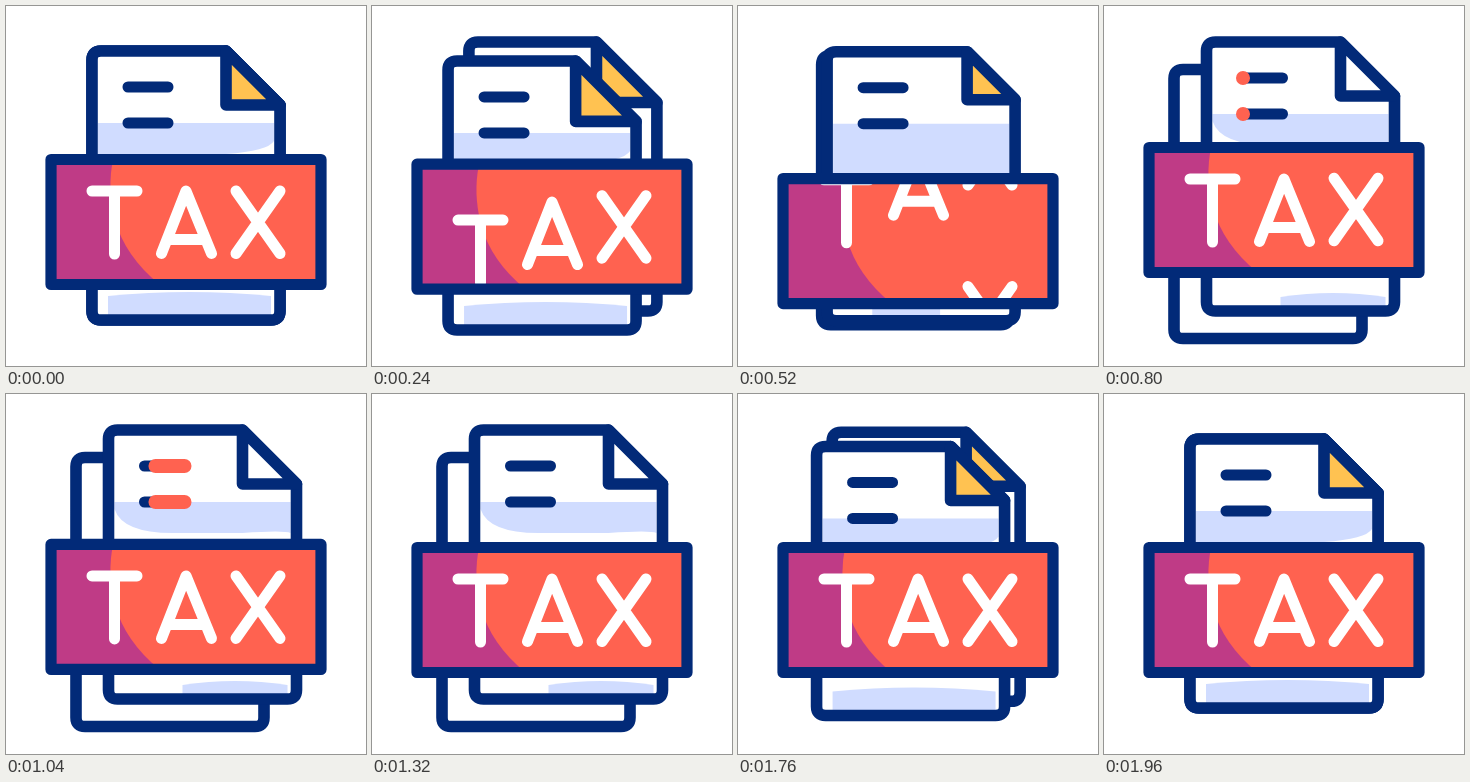
An HTML page that plays this animation: 360x360 px, repeating every 2 s.

```html
<!DOCTYPE html>
<html lang="en">
<head>
<meta charset="utf-8">
<title>Tax documents</title>
<style>
  html, body { margin: 0; width: 100%; height: 100%; overflow: hidden; background: #fff; }
  svg { display: block; width: 100vw; height: 100vh; }
  .ink { stroke: #022a78; stroke-width: 11.6; stroke-linecap: round; stroke-linejoin: round; }
  .line { stroke-width: 11; }
  .flap { fill: #ffc251; }
  .shade { fill: #d0dcff; }
  .mark { stroke: #ff6250; stroke-width: 14; stroke-linecap: round; }
  .frame { fill: none; stroke-width: 11.2; }
  .glyph { fill: none; stroke: #fff; stroke-width: 11; stroke-linecap: round; stroke-linejoin: round; }
</style>
</head>
<body>
<svg viewBox="0 0 360 360">
  <defs>
    <clipPath id="window"><rect x="45" y="153.500" width="270" height="125"/></clipPath>
  </defs>
  <g id="back">
    <path class="ink sheet" fill="#fff"/>
    <path class="ink flap"/>
  </g>
  <g id="front">
    <path class="sheet" fill="#fff"/>
    <path id="band" class="shade"/>
    <path id="foot" class="shade"/>
    <path class="ink sheet" fill="none"/>
    <path class="ink flap" id="frontFlap"/>
    <path class="ink line" d="M122 81H162M122 117H162"/>
    <path id="mark" class="mark"/>
  </g>
  <g id="label">
    <rect x="45" y="153.500" width="270" height="125" fill="#bf3b86"/>
    <path fill="#ff6250" d="M107 154Q101 182 109 214Q119 250 153 278H315V154Z"/>
    <g id="letters" clip-path="url(#window)"></g>
    <rect class="ink frame" x="45" y="153.500" width="270" height="125"/>
  </g>
</svg>
<script>
const LOOP = 2000;
const WRAP = 164, SCROLL = 580, FIRST = 100, STAGGER = 72;
const SVG = "http://www.w3.org/2000/svg";
const $ = id => document.getElementById(id);
const ramp = (t, from, to) => Math.min(1, Math.max(0, (t - from) / (to - from)));
const ease = (t, from, to) => {
  const u = ramp(t, from, to);
  return u * u * (3 - 2 * u);
};
const pulse = (t, from, to) => Math.sin(Math.PI * ramp(t, from, to)) ** 2;
const mix = (a, b, u) => a + (b - a) * u;
const move = (node, x, y) => node.setAttribute("transform", `translate(${x} ${y})`);
const setPath = (nodes, d) => nodes.forEach(node => node.setAttribute("d", d));

// Each sheet swings out to "near", then across to "far", and back the same way.
const sheets = [
  { node: $("front"), near: [-10.5, 10.5], far: [16.5, -9] },
  { node: $("back"), near: [11.5, -9.5], far: [-16, 18.5] }
];
const outlines = document.querySelectorAll(".sheet");
const flaps = document.querySelectorAll(".flap");

const letters = [
  "M86 185H131M108.500 185V248",
  "M155.500 247.500L180 185L205.500 247.500M164 233.500H197",
  "M230 185L274 247.500M274 185L230 247.500"
].map(d => {
  const group = document.createElementNS(SVG, "g");
  for (const y of [0, -WRAP]) {
    const glyph = document.createElementNS(SVG, "path");
    glyph.setAttribute("class", "glyph");
    glyph.setAttribute("d", d);
    move(glyph, 0, y);
    group.append(glyph);
  }
  $("letters").append(group);
  return group;
});

function drawSheets(t, swap) {
  const apart = ease(t, 0, 280) - ease(t, 1650, 1960);
  for (const { node, near, far } of sheets) {
    const [x, y] = near.map((v, i) => apart * mix(v, far[i], swap));
    move(node, x, y);
  }
  const fold = 54 + 6.5 * pulse(t, 60, 400) - 6 * pulse(t, 360, 680) + 6 * pulse(t, 1400, 1720);
  const x = 274 - fold, y = 45 + fold;
  setPath(outlines, `M86 54Q86 45 95 45H${x}L274 ${y}V305Q274 314 265 314H95Q86 314 86 305Z`);
  setPath(flaps, `M${x} 45V${y}H274Z`);
  $("frontFlap").style.fill = swap > 0.9 ? "#fff" : "";
}

function drawShading(t, swap) {
  const full = pulse(t, 360, 680);
  const base = 148 + 45 * full - 9 * pulse(t, 1400, 1720);
  const left = base - 24 * swap, right = base - 13 * (1 - swap);
  $("band").setAttribute("d",
    `M92 117H268V${right}Q262 ${base - 3} 220 ${base}H150Q100 ${base} 92 ${left}Z`);

  const x0 = 102 + 58 * swap, x1 = 265 - 66 * full, top = 286 + 10 * swap;
  $("foot").setAttribute("d",
    `M${x0} 309V${top + 4}Q${(x0 + x1) / 2} ${top - 4} ${x1} ${top + 4}V309Z`);
}

function drawMarks(t) {
  const head = mix(122.5, 162, ease(t, 800, 1040)) + 0.01;
  const tail = mix(122.5, 162, ease(t, 960, 1200));
  $("mark").setAttribute("d", `M${tail} 81H${head}M${tail} 117H${head}`);
  $("mark").style.display = t >= 760 && t < 1220 ? "" : "none";
}

function drawLabel(t) {
  const rise = ease(t, 500, 800);
  const drop = 19.5 * (ease(t, 120, 500) - rise) - 12 * (rise - ease(t, 800, 1160));
  move($("label"), 0, drop);
  letters.forEach((group, i) => {
    const start = FIRST + STAGGER * i;
    move(group, 0, WRAP * ease(t, start, start + SCROLL) % WRAP);
  });
}

function draw(t) {
  const swap = ease(t, 290, 750) - ease(t, 1330, 1635);
  drawSheets(t, swap);
  drawShading(t, swap);
  drawMarks(t);
  drawLabel(t);
}

const origin = performance.now();
function tick() {
  draw((performance.now() - origin) % LOOP);
  requestAnimationFrame(tick);
}
tick();
</script>
</body>
</html>
```
